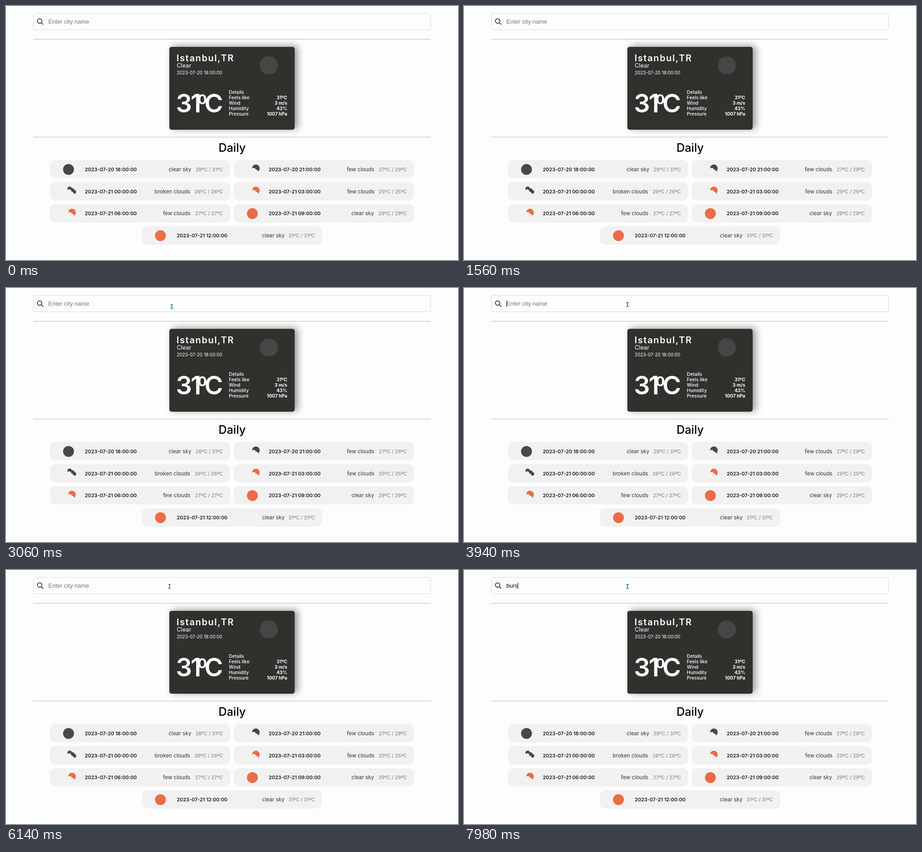
An HTML page for the animation above (8 s loop, 998 px wide and 561 px high).

```html
<!DOCTYPE html>
<html lang="en">
<head>
<meta charset="utf-8">
<title>Weather</title>
<style>
  html, body { margin: 0; width: 100%; height: 100%; overflow: hidden; background: #fdfdfd; }
  svg { display: block; width: 100vw; height: 100vh; }
  text { font-family: Inter, sans-serif; white-space: pre; }
  .end { text-anchor: end; }
  .field { font: 13px "Liberation Sans", Arial, sans-serif; }
  .panel { fill: #30302d; filter: drop-shadow(7px -2px 8px rgba(0, 0, 0, .4)); }
  .panel-text { fill: #fff; }
  .city { font-size: 20px; font-weight: 600; letter-spacing: 1.65px; }
  .degrees { font-size: 56px; font-weight: 600; }
  .ring { font-size: 30px; font-weight: 700; }
  .label { font-size: 10.3px; font-weight: 500; }
  .value { font-size: 10.2px; font-weight: 700; }
  .heading { font-size: 25.3px; font-weight: 500; text-anchor: middle; }
  .card { fill: #f1f1f1; }
  .date { font-size: 10.9px; font-weight: 600; fill: #1c1c1c; }
  .sky { font-size: 11.7px; fill: #333; }
  .temp { font-size: 10.8px; fill: #7c7c7c; }
</style>
</head>
<body>
<svg viewBox="0 0 998 561">
  <rect x="60.5" y="16.2" width="877" height="36.3" rx="3.5" fill="#fdfdfd" stroke="#d9d9cf"/>
  <g fill="none" stroke="#111" stroke-width="1.4" stroke-linecap="round">
    <circle cx="74.3" cy="33.3" r="5"/><path d="M78 37l4 3.8"/>
  </g>
  <text id="hint" class="field" x="93.5" y="39" fill="#757575">Enter city name</text>
  <text id="query" class="field" x="93.5" y="39"></text>
  <path id="caret" d="M94 27.5v14.5" stroke="#111"/>
  <path d="M60 73.5H938M60 289.5H938" stroke="#b8b8b2"/>

  <rect class="panel" x="360.6" y="90.2" width="276.8" height="183" rx="5"/>
  <circle cx="580.3" cy="131.3" r="20" fill="#464645"/>
  <g class="panel-text">
    <text class="city" x="376.5" y="122">Istanbul,TR</text>
    <text x="377" y="136.3" font-size="12.8">Clear</text>
    <text x="377" y="150.7" font-size="9.9">2023-07-20 18:00:00</text>
    <text class="degrees" x="375 407.5 438" y="235.3">31C</text>
    <text class="ring" x="423.3" y="217">0</text>
    <g id="details"></g>
  </g>

  <text class="heading" x="499.3" y="322">Daily</text>
  <g id="cards"></g>

  <g id="pointer">
    <path id="arrow" d="M0 0v9.2l2.2-1.9 1.7 3.5 1.4-.7-1.6-3.3h2.9z" fill="#1fdcae" stroke="#174b41" stroke-width=".7"/>
    <path id="beam" d="M-3-4h6M0-4V4.5M-3 4.5h6" fill="none" stroke="#23806c" stroke-width="1.7"/>
  </g>
</svg>
<script>
  const LOOP = 8000;
  const DARK = '#484944', ORANGE = '#ec6c46', CLOUD = '#f2f2ee';
  const $ = id => document.getElementById(id);
  const text = (cls, x, y, str) => `<text class="${cls}" x="${x}" y="${y}">${str}</text>`;
  const disc = (x, y, r, fill) => `<circle cx="${x}" cy="${y}" r="${r}" fill="${fill}"/>`;

  const details = [['Details', ''], ['Feels like', '31ºC'], ['Wind', '3 m/s'],
                   ['Humidity', '43%'], ['Pressure', '1007 hPa']];
  $('details').innerHTML = details.map(([name, value], i) => {
    const y = 194 + i * 12;
    return text('label', 492, y, name) + text('value end', 621, y, value);
  }).join('');

  const frontCloud = (x, y) =>
    `<rect x="${x - 17}" y="${y + 5}" width="20" height="8" rx="4" fill="${CLOUD}"/>` +
    disc(x - 5, y + 4, 5.2, CLOUD) + disc(x + 1, y + 6.5, 3.5, CLOUD);

  const icons = {
    clear: color => disc(41, 20.7, 12, color),
    few: color => disc(48.7, 18.4, 8.5, color) + frontCloud(48.7, 18.4),
    broken: color => disc(43.6, 14.8, 5, color) + disc(50, 18, 4.4, color) +
      disc(54, 21.5, 4, color) + disc(42.5, 21, 5, CLOUD) + disc(48, 25.5, 4.2, CLOUD)
  };

  // column x, row, icon, color, date, sky, right edge of sky, temperatures
  const cards = [
    [97, 0, 'clear', DARK, '2023-07-20 18:00:00', 'clear sky', 312, '28ºC / 31ºC'],
    [503, 0, 'few', DARK, '2023-07-20 21:00:00', 'few clouds', 310, '27ºC / 29ºC'],
    [97, 1, 'broken', DARK, '2023-07-21 00:00:00', 'broken clouds', 309.5, '26ºC / 26ºC'],
    [503, 1, 'few', ORANGE, '2023-07-21 03:00:00', 'few clouds', 310.5, '25ºC / 25ºC'],
    [97, 2, 'few', ORANGE, '2023-07-21 06:00:00', 'few clouds', 310, '27ºC / 27ºC'],
    [503, 2, 'clear', ORANGE, '2023-07-21 09:00:00', 'clear sky', 309.5, '29ºC / 29ºC'],
    [300, 3, 'clear', ORANGE, '2023-07-21 12:00:00', 'clear sky', 315, '31ºC / 31ºC']
  ];
  $('cards').innerHTML = cards.map(([x, row, icon, color, date, sky, skyEnd, temp]) =>
    `<g transform="translate(${x} ${340.2 + row * 48.8})">
      <rect class="card" width="398" height="40.4" rx="12"/>${icons[icon](color)}
      ${text('date', 77, 24.7, date)}${text('sky end', skyEnd, 24.7, sky)}${text('temp end', 382, 24.5, temp)}
    </g>`).join('');

  // time, x, y
  const path = [[1660, 545, 165], [1900, 472, 108], [2080, 460, 97], [2320, 440, 80],
                [2640, 378, 46], [2860, 366, 40.5], [3140, 366, 40.5], [3400, 361, 36]];
  const FOCUS = 3560;
  const keys = [[7380, 'b'], [7560, 'u'], [7740, 'r'], [7900, 's']];

  function pointerAt(t) {
    const i = path.findIndex(p => p[0] > t);
    if (i < 0) return path[path.length - 1].slice(1);
    const [t0, x0, y0] = path[i - 1], [t1, x1, y1] = path[i];
    const k = (t - t0) / (t1 - t0);
    return [x0 + (x1 - x0) * k, y0 + (y1 - y0) * k];
  }

  const show = (id, on) => $(id).setAttribute('visibility', on ? 'visible' : 'hidden');

  function draw(t) {
    const inView = t >= path[0][0];
    const [x, y] = inView ? pointerAt(t) : [0, 0];
    const overField = y < 53;
    $('pointer').setAttribute('transform', `translate(${x} ${y})`);
    show('arrow', inView && !overField);
    show('beam', inView && overField);

    const pressed = keys.filter(k => k[0] <= t);
    const typed = pressed.map(k => k[1]).join('');
    if ($('query').textContent !== typed) $('query').textContent = typed;
    show('hint', !typed);

    const since = typed ? pressed[pressed.length - 1][0] : FOCUS;
    show('caret', t >= FOCUS && (t - since) % 1000 < 500);
    const width = typed ? $('query').getComputedTextLength() : 0;
    $('caret').setAttribute('transform', `translate(${Math.round(width - .5)} 0)`);
  }

  const start = performance.now();
  function tick() {
    draw((performance.now() - start) % LOOP);
    requestAnimationFrame(tick);
  }
  tick();
</script>
</body>
</html>
```
